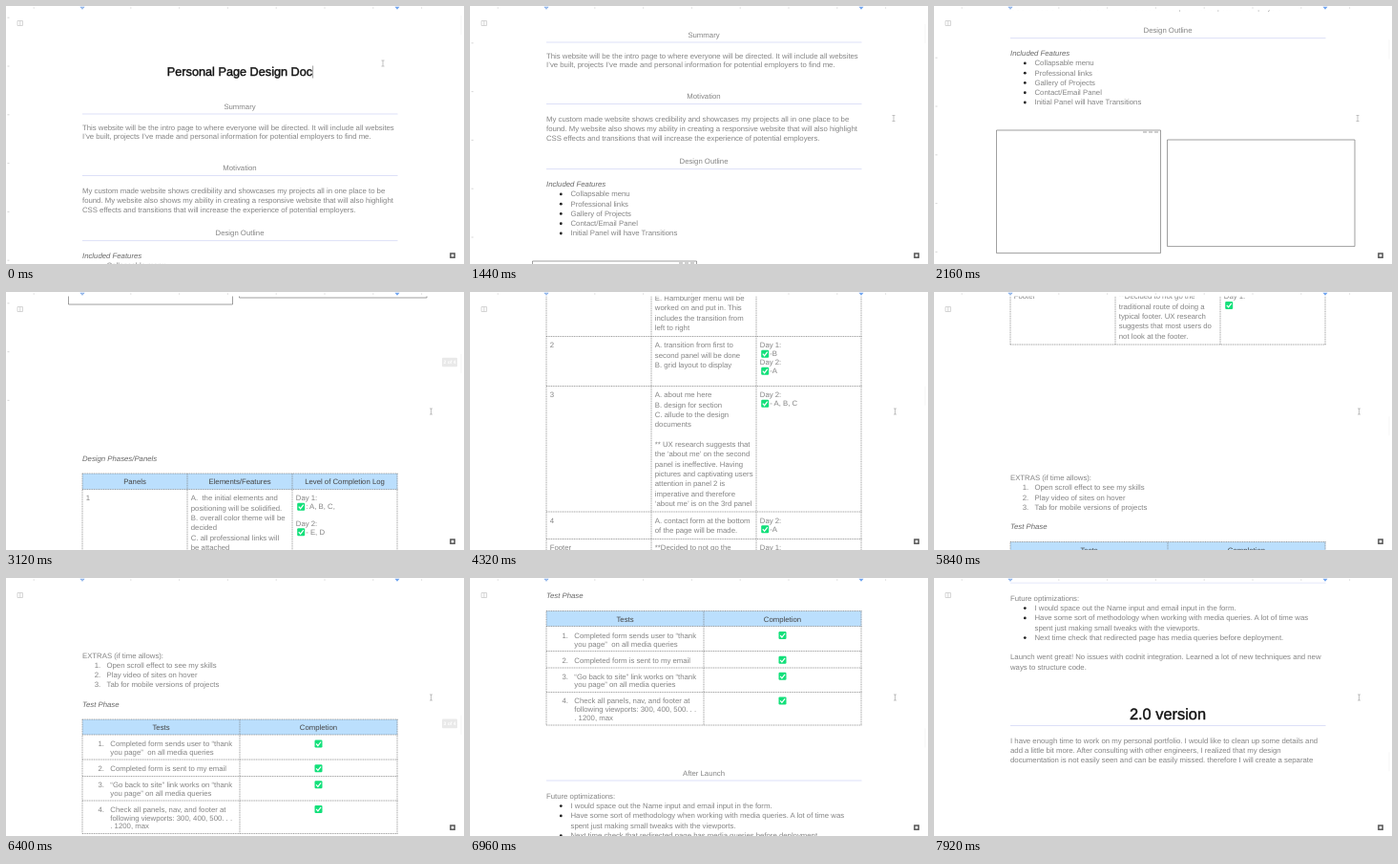
Recreate the animation shown at these times as an HTML page. Size 480 px wide and 270 px high, loop 8 s.

```html
<!DOCTYPE html>
<html lang="en">
<head>
<meta charset="utf-8">
<title>Design doc scroll</title>
<style>
  html, body { margin: 0; width: 100%; height: 100%; overflow: hidden; background: #fff; }
  svg { display: block; width: 100vw; height: 100vh; }
  text {
    font: 7.77px "Liberation Sans", Arial, sans-serif;
    fill: #848484; white-space: pre; text-rendering: geometricPrecision;
  }
  .mid { text-anchor: middle; }
  .italic { font-style: italic; fill: #666; }
  .head { fill: #444; }
  .title { fill: #111; stroke: #111; stroke-width: .4px; }
</style>
</head>
<body>
<svg id="stage" viewBox="0 0 480 270">
  <g id="doc"></g>
  <g id="chrome">
    <rect width="480" height="4.5" fill="#fff"/>
    <path d="M77.5 .8h5l-2.5 3zM407.5 .8h5l-2.5 3z" fill="#6fa4f0"/>
    <path d="M12 15.5h5.5v5h-5.5zM14.75 15.5v5" fill="none" stroke="#ccc" stroke-width=".8"/>
    <rect x="465.9" y="259" width="4.2" height="4.2" fill="#fff" stroke="#555" stroke-width="1.5"/>
  </g>
  <rect id="thumb" x="476.5" width="1" height="20" fill="#f5f5f5"/>
  <g id="pageTip">
    <rect x="457" y="-4.8" width="16" height="9.6" rx="1" fill="#e9e9e9"/>
    <text class="mid" x="465" y="1.9" style="font-size:5px;font-weight:bold;fill:#fff"></text>
  </g>
  <path id="pointer" d="M-1.5 -3h3M0 -3v6M-1.5 3h3" fill="none" stroke="#aaa" stroke-width=".7"/>
</svg>
<script>
const $ = id => document.getElementById(id);
const doc = $('doc'), chrome = $('chrome');

function add(parent, tag, attrs, content = '') {
  const el = document.createElementNS('http://www.w3.org/2000/svg', tag);
  for (const key in attrs) el.setAttribute(key, attrs[key]);
  el.textContent = content;
  parent.append(el);
  return el;
}

// y is the middle of the capitals
const text = (x, y, content, cls = '') =>
  add(doc, 'text', { x, y: y + 2.8, class: cls }, content);
const lines = (x, y, list, pitch = 10.33) => list.forEach((s, i) => text(x, y + i * pitch, s));
const line = (d, stroke, width, parent = doc) =>
  add(parent, 'path', { d, fill: 'none', stroke, 'stroke-width': width });
const border = d => line(d, '#777', 0.7).setAttribute('stroke-dasharray', '1 .7');
const rule = y => line(`M80 ${y}H410.5`, '#cfd3f5', 0.7);
const heading = (y, content) => {
  text(245, y, content, 'mid');
  rule(y + 8);
};
const title = (y, content, size) =>
  add(doc, 'text', {
    x: 245, y: y + size * 0.34, class: 'mid title', style: `font-size:${size}px`
  }, content);
const bullet = y => add(doc, 'circle', { cx: 95.3, cy: y + 0.4, r: 1.4, fill: '#222' });

function check(x, y, label = '') {
  add(doc, 'rect', { x: x - 4, y: y - 4, width: 8, height: 8, rx: 1.2, fill: '#12e07a' });
  line(`M${x - 2.4} ${y}l1.8 2 3.2 -4`, '#fff', 1.2);
  text(x + 5, y, label);
}

function table(top, headBottom, columns, rowLines, heads) {
  const bottom = rowLines.at(-1);
  add(doc, 'rect', { x: 80, y: top, width: 330.3, height: headBottom - top, fill: '#bbdffd' });
  [top, headBottom, ...rowLines].forEach(y => border(`M80 ${y}H410.5`));
  columns.forEach(x => border(`M${x} ${top}V${bottom}`));
  heads.forEach((h, i) =>
    text((columns[i] + columns[i + 1]) / 2, (top + headBottom) / 2 + 0.4, h, 'mid head'));
}

// Page 1
title(69, 'Personal Page Design Doc', 12.7);
line('M321.6 62.5V75.5', '#777', 0.7);
heading(105, 'Summary');
lines(80, 127.3, [
  'This website will be the intro page to where everyone will be directed. It will include all websites',
  'I’ve built, projects I’ve made and personal information for potential employers to find me.'], 9.1);
heading(169.5, 'Motivation');
lines(80, 193, [
  'My custom made website shows credibility and showcases my projects all in one place to be',
  'found. My website also shows my ability in creating a responsive website that will also highlight',
  'CSS effects and transitions that will increase the experience of potential employers.']);
heading(237.6, 'Design Outline');
text(80, 261, 'Included Features', 'italic');
['Collapsable menu', 'Professional links', 'Gallery of Projects', 'Contact/Email Panel',
  'Initial Panel will have Transitions'].forEach((s, i) => {
  const y = 271.5 + i * 10.28;
  bullet(y);
  text(105.5, y, s);
});
line('M65.5 342H237.5V470.6H65.5ZM219 344h4M225 344h4M231 344h4', '#777', 0.7);
line('M244.5 352H441V463.6H244.5Z', '#777', 0.7);

// Page 2
text(80, 631.6, 'Design Phases/Panels', 'italic');
table(647.6, 664.2, [80, 190, 300, 410], [785.7, 837.7, 969.2, 997.7, 1056.6],
  ['Panels', 'Elements/Features', 'Level of Completion Log']);
const panels = [
  [673.1, '1', ['A.  the initial elements and', 'positioning will be solidified.',
    'B. overall color theme will be', 'decided', 'C. all professional links will', 'be attached',
    'D. Gallery links will work', 'E. Hamburger menu will be', 'worked on and put in. This',
    'includes the transition from', 'left to right'],
    [[0, 'Day 1:', ': A, B, C,'], [26.5, 'Day 2:', '- E, D']]],
  [794.7, '2', ['A. transition from first to', 'second panel will be done', 'B. grid layout to display'],
    [[0, 'Day 1:', '-B'], [18, 'Day 2:', '-A']]],
  [846.7, '3', ['A. about me here', 'B. design for section', 'C. allude to the design', 'documents', '',
    '** UX research suggests that', 'the ‘about me’ on the second', 'panel is ineffective. Having',
    'pictures and captivating users', 'attention in panel 2 is', 'imperative and therefore',
    '‘about me’ is on the 3rd panel'],
    [[0, 'Day 2:', '- A, B, C']]],
  [978.2, '4', ['A. contact form at the bottom', 'of the page will be made.'], [[0, 'Day 2:', '-A']]],
  [1006.3, 'Footer', ['**Decided to not go the', 'traditional route of doing a',
    'typical footer. UX research', 'suggests that most users do', 'not look at the footer.'],
    [[0, 'Day 1:', '']]]
];
for (const [y, name, features, log] of panels) {
  text(83.7, y, name);
  lines(193.8, y, features);
  for (const [dy, day, done] of log) {
    text(303.8, y + dy, day);
    check(309.2, y + dy + 9.2, done);
  }
}

// Page 3
text(80, 1196, 'EXTRAS (if time allows):');
['Open scroll effect to see my skills', 'Play video of sites on hover',
  'Tab for mobile versions of projects'].forEach((s, i) => {
  text(92.8, 1206.2 + i * 10.3, `${i + 1}.`);
  text(105.5, 1206.2 + i * 10.3, s);
});
text(80, 1247, 'Test Phase', 'italic');
table(1263.1, 1279.1, [80, 245, 410], [1305.1, 1322.6, 1348.1, 1382.6], ['Tests', 'Completion']);
[
  [1288.6, ['Completed form sends user to “thank', 'you page”  on all media queries']],
  [1314.4, ['Completed form is sent to my email']],
  [1331.4, ['“Go back to site” link works on “thank', 'you page” on all media queries']],
  [1357, ['Check all panels, nav, and footer at', 'following viewports: 300, 400, 500. . .', '. 1200, max']]
].forEach(([y, list], i) => {
  text(96.5, y, `${i + 1}.`);
  lines(109.3, y, list, 8.9);
  check(327.5, y);
});
heading(1432.6, 'After Launch');
lines(80, 1456.6, ['Future optimizations:']);
lines(105.5, 1466.8, [
  'I would space out the Name input and email input in the form.',
  'Have some sort of methodology when working with media queries. A lot of time was',
  'spent just making small tweaks with the viewports.',
  'Next time check that redirected page has media queries before deployment.']);
[0, 1, 3].forEach(i => bullet(1466.8 + i * 10.33));
lines(80, 1518.1, [
  'Launch went great! No issues with codnit integration. Learned a lot of new techniques and new',
  'ways to structure code.']);
title(1577.6, '2.0 version', 16.4);
rule(1590.1);
lines(80, 1605.6, [
  'I have enough time to work on my personal portfolio. I would like to clean up some details and',
  'add a little bit more. After consulting with other engineers, I realized that my design',
  'documentation is not easily seen and can be easily missed. therefore I will create a separate']);

// Rulers, one tick per inch
const INCH = 50.8;
for (let i = 0; i < 12; i++) line(`M1.5 ${12.2 + i * INCH}h2`, '#ccc', 0.8);
for (let i = 0; i < 9; i++) line(`M${29.2 + i * INCH} 1v2`, '#ddd', 0.8, chrome);

const LOOP = 8000, STEP = 80;
const scrollKeys = [[0, 0], [720, 0], [1120, 22], [1440, 75], [2160, 212], [2240, 212], [2320, 217],
  [2400, 217], [2480, 228], [3120, 457.6], [4320, 739.2], [4400, 739.2], [4720, 813], [4800, 813],
  [5200, 872], [5280, 872], [5520, 928], [5600, 928], [5840, 1001.6], [6960, 1228.6],
  [7360, 1322], [7440, 1322], [7920, 1435.6]];
const pointerX = [[80, 395], [960, 444], [2240, 444], [2320, 445.5]];
const pointerY = [[80, 60], [960, 117.5], [2240, 117.5], [2320, 125]];

function at(keys, t) {
  const i = keys.findIndex(k => k[0] >= t);
  if (i < 0) return keys.at(-1)[1];
  if (i === 0) return keys[0][1];
  const [t0, a] = keys[i - 1], [t1, b] = keys[i];
  return a + (b - a) * (t - t0) / (t1 - t0);
}

function draw(now) {
  const t = Math.floor(now % LOOP / STEP) * STEP;
  const scroll = at(scrollKeys, t);
  const thumbY = 10 + scroll * 0.12;
  doc.setAttribute('transform', `translate(0 ${-scroll})`);
  $('thumb').setAttribute('y', thumbY);
  $('pointer').setAttribute('transform', `translate(${at(pointerX, t)} ${at(pointerY, t)})`);
  const tip = $('pageTip');
  const shown = (t >= 2480 && t <= 3440) || (t >= 5920 && t <= 6560);
  tip.setAttribute('visibility', shown ? 'visible' : 'hidden');
  tip.setAttribute('transform', `translate(0 ${thumbY + 8.6})`);
  tip.lastElementChild.textContent = `${scroll < 900 ? 2 : 3} of 4`;
  requestAnimationFrame(draw);
}
draw(0);
</script>
</body>
</html>
```
